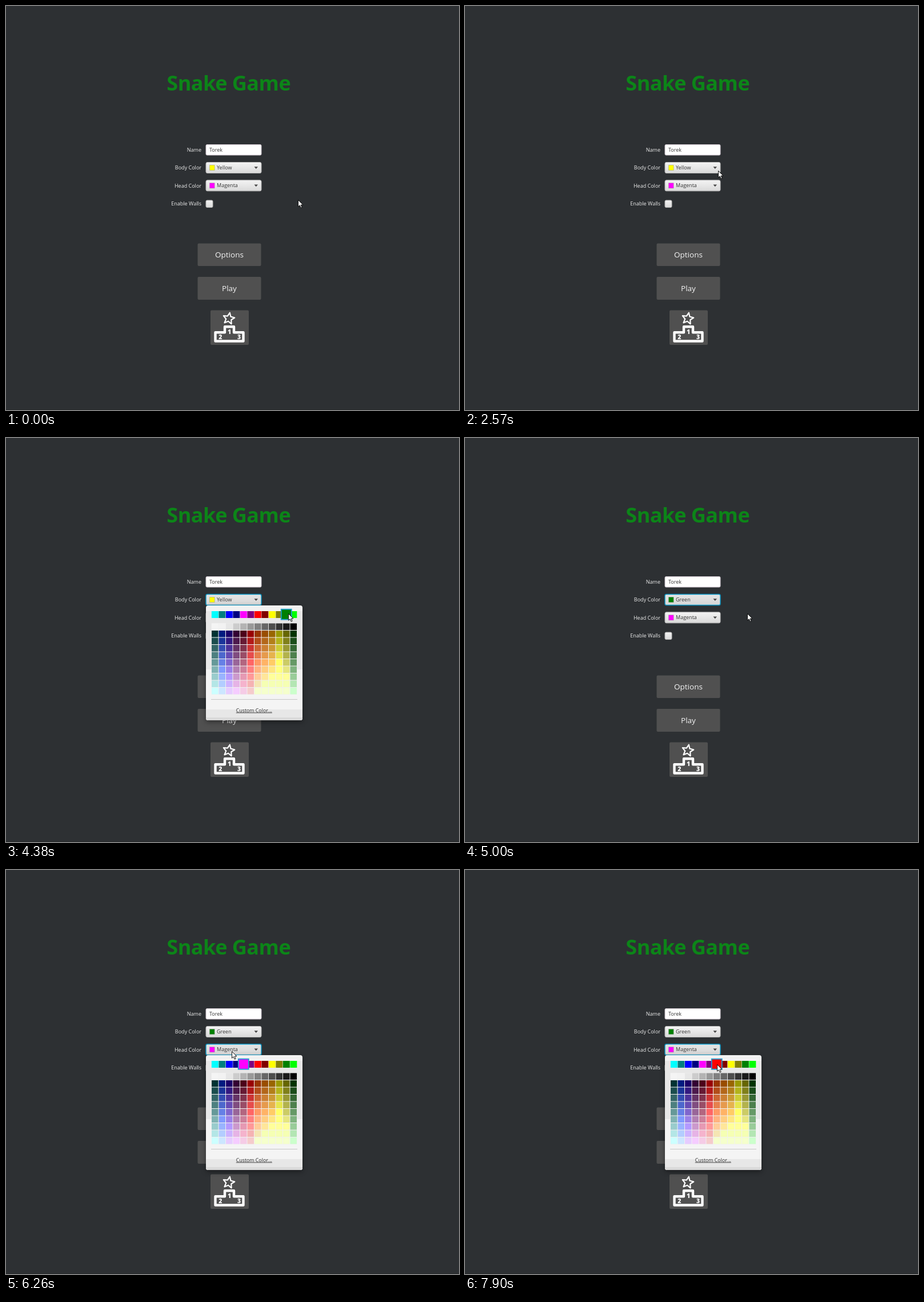
An HTML page for the animation above (8000 ms loop, 793 by 707 pixels).

```html
<!DOCTYPE html>
<html lang="en">
<head>
<meta charset="utf-8">
<title>Snake Game menu</title>
<style>
  html, body { margin: 0; width: 100%; height: 100%; overflow: hidden; background: #2d3033; }
  svg { display: block; width: 793px; height: 707px; font: 9px "Open Sans", "Noto Sans", sans-serif; }
  .label { fill: #ececec; text-anchor: end; }
  .value { fill: #333; }
  .big { font-size: 13.5px; fill: #f4f4f4; text-anchor: middle; }
  .btn { fill: #505050; }
  .icon { fill: none; stroke: #fff; stroke-linejoin: round; }
  .num { font-size: 10.5px; font-weight: 800; fill: #fff; text-anchor: middle; }
  .focus .face { fill: url(#pressed); stroke: #0a97c6; stroke-width: 1.4; }
  .face { fill: url(#face); stroke: #b4b4b4; }
  #popup { filter: drop-shadow(0 3px 4px rgba(0,0,0,.4)); }
</style>
</head>
<body>
<svg viewBox="0 0 793 707">
  <defs>
    <linearGradient id="face" x2="0" y2="1">
      <stop stop-color="#f4f4f4"/><stop offset="1" stop-color="#d9d9d9"/>
    </linearGradient>
    <linearGradient id="pressed" x2="0" y2="1">
      <stop stop-color="#e6e6e6"/><stop offset="1" stop-color="#d6d6d6"/>
    </linearGradient>
    <clipPath id="panel"><rect x="350" y="293" width="169" height="201" rx="4"/></clipPath>
  </defs>
  <rect width="793" height="707" fill="#2d3033"/>
  <rect y="706" width="793" height="1" fill="#25282a"/>
  <text x="281.3" y="148" font-size="36" font-weight="700" letter-spacing="-.5" fill="#0c8518">Snake Game</text>

  <text class="label" x="342" y="255">Name</text>
  <text class="label" x="342" y="286">Body Color</text>
  <text class="label" x="342" y="317.5">Head Color</text>
  <text class="label" x="342" y="349">Enable Walls</text>
  <rect x="350" y="242.5" width="97" height="18.5" rx="2" fill="#fff" stroke="#c9bfc9"/>
  <text class="value" x="356" y="255">Torek</text>
  <g id="body"></g>
  <g id="head" transform="translate(0 31.3)"></g>
  <rect class="face" x="350" y="340" width="12" height="12.5" rx="2"/>

  <rect class="btn" x="335.5" y="415.5" width="111" height="39.5" rx="2"/>
  <text class="big" x="391" y="440.3">Options</text>
  <rect class="btn" x="335.5" y="474" width="111" height="40" rx="2"/>
  <text class="big" x="391" y="499">Play</text>
  <rect class="btn" x="358" y="532.5" width="67" height="60.5" rx="2"/>
  <polygon id="star" class="icon" stroke-width="2.2"/>
  <path class="icon" stroke-width="4.4" d="M366.5 571.3H383V561.3H399V571.3H415.5V586.5H366.5Z"/>
  <text class="num" x="391" y="573.5">1</text>
  <text class="num" x="375.3" y="583">2</text>
  <text class="num" x="408" y="583">3</text>

  <g id="popup">
    <g id="bands" clip-path="url(#panel)"></g>
    <g id="cells"></g>
    <rect x="359" y="457" width="151" height="1" fill="#c6c6c6"/>
    <text class="value" x="434.3" y="479.5" font-size="8.8" text-anchor="middle" text-decoration="underline">Custom Color...</text>
    <rect id="pick" width="18" height="18" stroke="#1f9fd0" stroke-width="1.8"/>
  </g>
  <path id="cursor" fill="#fff" stroke="#000" stroke-width=".9"
    d="M.5 .5V12.2L3.2 9.7 5.2 14.2 7.1 13.4 5.2 9H8.9Z"/>
</svg>
<script>
const LOOP = 8000, LEFT = 359.5, PITCH = 12.5, HEAD_SHIFT = 31;
const $ = id => document.getElementById(id);
const rect = (x, y, w, h, fill) => `<rect x="${x}" y="${y}" width="${w}" height="${h}" fill="${fill}"/>`;

const named = ['#0ff', '#008080', '#00f', '#000080', '#f0f', '#800080',
  '#f00', '#800000', '#ff0', '#808000', '#008000', '#0f0'];
const greys = [244, 242, 230, 204, 179, 153, 128, 102, 77, 51, 26, 0];
// Darkest shade of each column; every row below is 10% lighter.
const shades = [[0, 51, 51], [0, 26, 128], [26, 0, 104], [51, 0, 51], [77, 0, 26], [153, 0, 0],
  [153, 51, 0], [153, 77, 0], [153, 102, 0], [153, 153, 0], [102, 102, 0], [0, 51, 0]];

function shade([r, g, b], row) {
  const up = (v, top) => Math.min(top, Math.round(v + row * 25.5));
  return `rgb(${up(r, row > 6 ? 245 : 255)},${up(g, 255)},${up(b, 255)})`;
}

function buildCombo(id, colour, name) {
  $(id).innerHTML = `<rect class="face" x="350" y="273.5" width="97" height="19" rx="2.5"/>
    <rect class="chip" x="356.5" y="278.5" width="8.6" height="9" fill="${colour}" stroke="#777" stroke-opacity=".35"/>
    <text class="value" x="369" y="286">${name}</text><path d="M434.5 281.3H441L437.75 285Z" fill="#444"/>`;
}

function buildPopup() {
  const bands = [[293, '#f2f2f2'], [303, '#e7e7e7'], [405, '#f4f4f4'], [475, '#e7e7e7'], [489, '#dadada']];
  $('bands').innerHTML = bands.map(([y, c]) => rect(350, y, 169, 494 - y, c)).join('');
  let out = rect(LEFT, 324, 150, 125, '#f0f0f0');
  for (let i = 0; i < 12; i++) {
    const x = LEFT + i * PITCH;
    out += rect(x + .4, 303, 11.9, 12, named[i]);
    out += rect(x + .5, 324.4, 11.6, 11.6, `rgb(${greys[i]},${greys[i]},${greys[i]})`);
    for (let r = 0; r < 9; r++)
      out += rect(x + .5, 324.5 + (r + 1) * PITCH, 11.5, 11.5, shade(shades[i], r));
  }
  $('cells').innerHTML = out;
}

function buildStar() {
  const pts = [];
  for (let i = 0; i < 10; i++) {
    const a = i * Math.PI / 5 - Math.PI / 2 + .17, r = i % 2 ? 4.8 : 10.4;
    pts.push([390 + r * Math.cos(a), 547 + r * Math.sin(a)]);
  }
  $('star').setAttribute('points', pts.join(' '));
}

// Cursor stops: time, x, y
const stops = [[0, 511, 339], [530, 511, 339], [1110, 461, 299], [2110, 461, 299], [2930, 431, 280],
  [3540, 431, 280], [4380, 494, 307], [5280, 494, 307], [5610, 440, 306], [6010, 395, 317],
  [6820, 395, 317], [7470, 432, 338], [7690, 432, 338], [7900, 441, 340], [LOOP, 441, 340]];

function cursorAt(t) {
  const i = stops.findIndex(s => s[0] > t), [t0, x0, y0] = stops[i - 1], [t1, x1, y1] = stops[i];
  const p = (t - t0) / (t1 - t0);
  const e = t0 === 5280 ? 1 - Math.cos(p * Math.PI / 2)
    : t0 === 5610 ? Math.sin(p * Math.PI / 2)
    : (1 - Math.cos(p * Math.PI)) / 2;
  return [Math.round(x0 + (x1 - x0) * e), Math.round(y0 + (y1 - y0) * e)];
}

function draw(now) {
  const t = now % LOOP, [x, y] = cursorAt(t);
  const bodyOpen = t >= 3050 && t < 5000, headOpen = t >= 6260, green = t >= 5000;
  $('cursor').setAttribute('transform', `translate(${x} ${y})`);
  $('body').setAttribute('class', t >= 2960 && t < 6260 ? 'focus' : '');
  $('head').setAttribute('class', headOpen ? 'focus' : '');
  $('body').querySelector('.chip').setAttribute('fill', green ? '#008000' : '#ff0');
  $('body').querySelector('text').textContent = green ? 'Green' : 'Yellow';

  $('popup').style.display = bodyOpen || headOpen ? '' : 'none';
  const shift = headOpen ? HEAD_SHIFT : 0;
  $('popup').setAttribute('transform', `translate(0 ${shift})`);
  const hovering = y - shift >= 303 && y - shift < 315;
  const i = hovering ? Math.max(0, Math.min(11, Math.floor((x - LEFT) / PITCH))) : headOpen ? 4 : 8;
  $('pick').setAttribute('x', LEFT + (i + .5) * PITCH - 9);
  $('pick').setAttribute('y', 299.7);
  $('pick').setAttribute('fill', named[i]);
}

buildCombo('body', '#ff0', 'Yellow');
buildCombo('head', '#f0f', 'Magenta');
buildPopup();
buildStar();
const start = performance.now();
(function frame() {
  draw(performance.now() - start);
  requestAnimationFrame(frame);
})();
</script>
</body>
</html>
```
